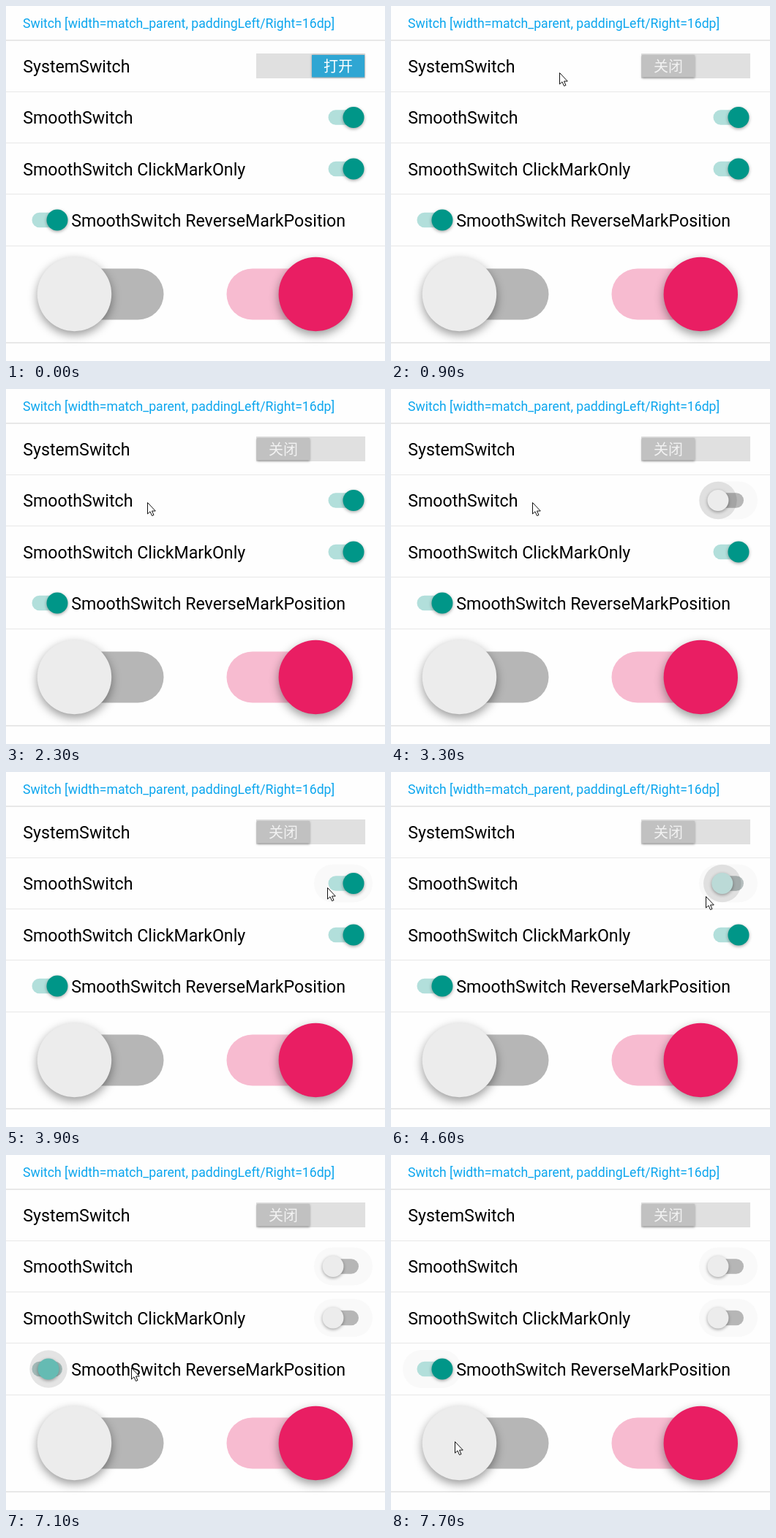
Animation, 518 px wide and 486 px high, one loop 8 s. Source, as an HTML page with a canvas:

```html
<!DOCTYPE html>
<html lang="en">
<head>
<meta charset="utf-8">
<title>Switches</title>
<style>
html, body { margin: 0; width: 100%; height: 100%; overflow: hidden; background: #fefefe; }
canvas { display: block; }
</style>
</head>
<body>
<canvas id="stage" width="518" height="486"></canvas>
<script>
const g = document.getElementById('stage').getContext('2d');
const LOOP = 8000, STEP = 100;
const SLIDE = 233; // ms a thumb takes from end to end
const ROW = 70.3;
const TEAL = [0, 150, 136], TEAL_TRACK = [178, 223, 219];
const PINK = [233, 30, 99], PINK_TRACK = [247, 187, 208];
const OFF = [236, 236, 236], OFF_TRACK = [182, 182, 182];

// The pointer glides to each stop and rests there: start, end, x, y
const moves = [
  [200, 200, 351, 79], [200, 300, 231, 92], [1100, 1400, 428, 87],
  [1900, 2300, 194, 156], [3600, 3900, 440, 159], [4100, 4600, 431, 171],
  [4600, 4900, 298, 226], [5200, 5400, 497, 226], [5500, 5800, 484, 224],
  [6400, 6700, 298, 227], [6700, 6800, 172, 292], [7500, 7700, 88, 393]
];
const systemFlips = [800, 1200, 1800];
// Each tap: time pressed, time the thumb starts to slide
const smoothTaps = [[2500, 2500], [3200, 3400], [4200, 4415]];
const markTaps = [[5900, 6100]];
const reverseTaps = [[7000, 7000], [7400, 7400]];

const rgb = c => `rgb(${c.join()})`;
const lerp = (a, b, p) => a + (b - a) * p;
const mix = (a, b, p) => rgb(a.map((v, i) => Math.round(lerp(v, b[i], p))));
const progress = (t, start, span) => Math.min(1, Math.max(0, (t - start) / span));

function rect(x, y, w, h, fill) {
  g.fillStyle = fill;
  g.fillRect(x, y, w, h);
}

function pill(x, y, w, h, fill) {
  g.fillStyle = fill;
  g.beginPath();
  g.roundRect(x, y - h / 2, w, h, h / 2);
  g.fill();
}

function disc(x, y, r, fill) {
  g.fillStyle = fill;
  g.beginPath();
  g.arc(x, y, r, 0, 7);
  g.fill();
}

function text(s, x, y, size, fill, family = 'Roboto') {
  g.font = `${size}px ${family}, sans-serif`;
  g.fillStyle = fill;
  g.fillText(s, x, y);
}

function shaded(alpha, blur, dy, draw) {
  g.save();
  g.shadowColor = `rgba(0,0,0,${alpha})`;
  g.shadowBlur = blur;
  g.shadowOffsetY = dy;
  draw();
  g.restore();
}

function systemSwitch(t) {
  const on = systemFlips.filter(f => f <= t).length % 2 === 0;
  const pressed = systemFlips.some(f => t >= f - STEP && t < f);
  const x = on ? 418 : 343;
  const fill = !on ? '#c1c1c1' : pressed ? '#5bbde4' : '#2fa6d3';
  rect(342, 65, 149, 34, '#e0e0e0');
  shaded(.35, 3, on ? 0 : 1, () => rect(x, 67, 72, 30.5, fill));
  text(on ? '打开' : '关闭', x + 16, 90, 20, on ? '#fff' : '#f2f2f2', '"Noto Sans CJK SC", "Noto Sans CJK"');
}

// x is the centre of the thumb when on
function smoothSwitch(x, y, taps, t) {
  const p = taps.reduce((v, [, slide], i) => lerp(v, i % 2, progress(t, slide, SLIDE)), 1);
  const pressed = taps.some(([press, slide]) => t > press && t < slide + SLIDE);
  const thumb = x - 28 * (1 - p);
  // a faint halo stays after the first tap
  if (t > taps[0][1] + SLIDE) pill(x - 54, y, 80, 52, '#f9f9f9');
  pill(x - 34.5, y, 41.5, 20.5, mix(OFF_TRACK, TEAL_TRACK, p));
  if (pressed) disc(thumb, y, 25.7, 'rgba(0,0,0,.1)');
  shaded(.35, 4, 1.5, () => disc(thumb, y, 14.5, mix(OFF, TEAL, p)));
}

function bigSwitch(x, trackX, track, thumb) {
  pill(trackX, 394.5, 151, 70, rgb(track));
  shaded(.4, 13, 5, () => disc(x, 394.5, 50.7, rgb(thumb)));
}

function cursor(t) {
  if (t < moves[0][0]) return;
  let x = 0, y = 0;
  for (const [start, end, toX, toY] of moves) {
    if (t < start) break;
    const p = progress(t, start, end - start || 1e-6) || +(start === end);
    x = lerp(x, toX, p);
    y = lerp(y, toY, p);
  }
  g.save();
  g.translate(Math.round(x) - .5, Math.round(y) - .5);
  g.fillStyle = '#fff';
  g.strokeStyle = '#111';
  const arrow = new Path2D('M0 0V15.5L3.5 12.3L6 18L8.5 17L6 11.5H10.8Z');
  g.fill(arrow);
  g.stroke(arrow);
  g.restore();
}

function draw(t) {
  rect(0, 0, 518, 486, '#fefefe');
  for (let i = 1; i < 5; i++) rect(0, Math.floor(47 + ROW * i), 518, 1, '#e8e8e8');
  for (const y of [46, 460]) rect(0, y, 518, 2, '#e8e8e8');

  text('Switch [width=match_parent, paddingLeft/Right=16dp]', 23, 29.5, 17.65, '#0ca6ee');
  systemSwitch(t);
  smoothSwitch(475, 152.5, smoothTaps, t);
  smoothSwitch(475, 223, markTaps, t);
  smoothSwitch(70, 293, reverseTaps, t);
  ['SystemSwitch', 'SmoothSwitch', 'SmoothSwitch ClickMarkOnly', 'SmoothSwitch ReverseMarkPosition']
    .forEach((s, i) => text(s, i < 3 ? 23.2 : 89.2, 91 + ROW * i, 23.2, '#000'));
  bigSwitch(93.5, 64.5, OFF_TRACK, OFF);
  bigSwitch(423.3, 301.5, PINK_TRACK, PINK);
  cursor(t);
}

const start = performance.now();
function tick() {
  const t = (performance.now() - start) % LOOP;
  draw(Math.floor(t / STEP) * STEP);
  requestAnimationFrame(tick);
}
tick();
</script>
</body>
</html>
```
